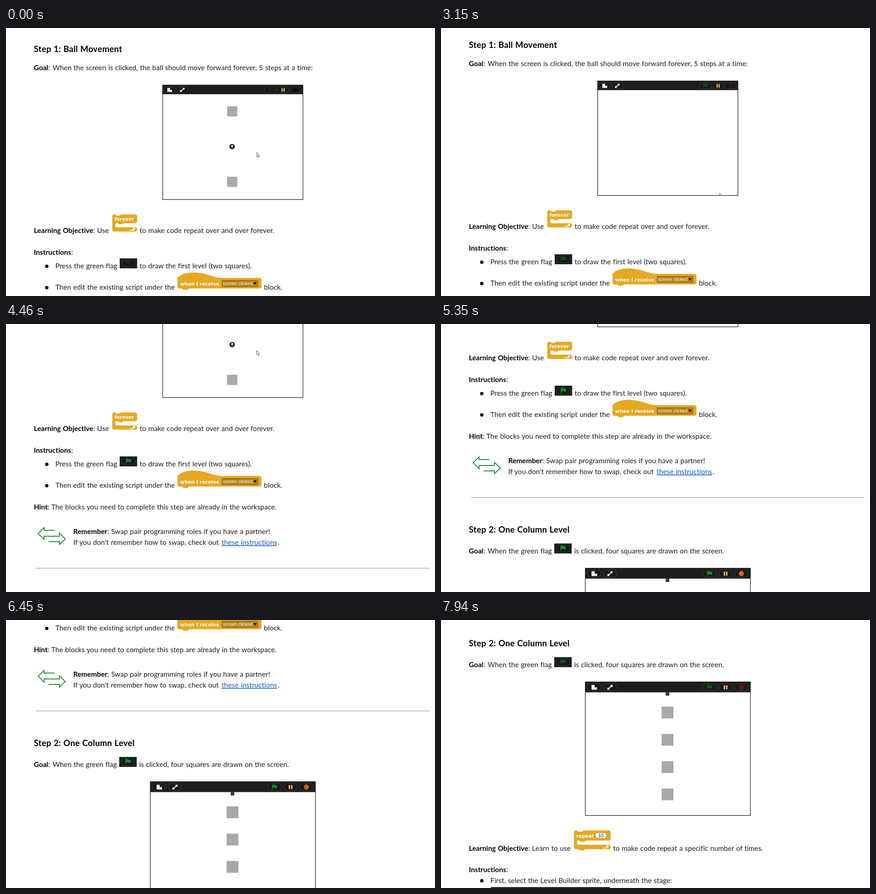
Write an HTML page that moves like this. It is 947 px wide and 591 px high and loops after 8000 ms.

```html
<!DOCTYPE html>
<html lang="en">
<head>
<meta charset="utf-8">
<title>Ball Movement</title>
<style>
html, body { margin: 0; width: 100%; height: 100%; overflow: hidden; background: #fff; }
svg { display: block; width: 100vw; height: 100vh; }
text { font: 15.5px Lato, Carlito, sans-serif; letter-spacing: .04px; word-spacing: .6px; fill: #1a1a1a; white-space: pre; }
.b { font-weight: 700; fill: #000; }
.h { font-size: 18.7px; font-weight: 700; letter-spacing: .25px; fill: #000; }
.link { fill: #15c; }
.code { font: 700 10.5px "DejaVu Sans", sans-serif; letter-spacing: 0; word-spacing: 0; fill: #fff; }
.slot { font: 10.3px "Liberation Sans", sans-serif; letter-spacing: 0; word-spacing: 0; fill: #fff; }
.block { fill: #e6a822; stroke: #d69b20; stroke-width: .6; }
.pill { fill: #191919; stroke: #3b3b3d; }
.frame { fill: #fff; stroke: #222; stroke-width: 1.3; }
.sq { fill: #a9a9a9; }
.flag { fill: var(--flag); }
.stop { fill: var(--stop); }
</style>
</head>
<body>
<svg viewBox="0 0 947 591">
  <defs>
    <clipPath id="view"><rect x="347" y="146" width="308" height="231.500"/></clipPath>
    <rect id="pill" class="pill" x="-13" y="-7" width="26" height="14" rx="7"/>
    <path id="flag" class="flag" d="M-5-4.500C-2-6 0-3 5-3.500L4.500 2C1 3-1 0-3.500 1.500L-4 5H-5Z"/>
    <g id="inlineFlag">
      <rect width="38.500" height="22" fill="#1c1c1f"/>
      <rect class="pill" x="4" y="2" width="30.500" height="17" rx="8.500"/>
      <use href="#flag" transform="translate(19.500 10.500) scale(1.200)"/>
    </g>
    <path id="loop" d="M-7 3H0Q4 3 4 0H7L3-4-1 0H2Q2 1.500 0 1.500H-7Z" fill="#fff"/>
    <path id="size" d="M-5-4.500H1V0H5.500V4.500H-5ZM1-4.500" fill="#fff"/>
    <path id="full" d="M.5-4.500H5V0L3.400-1.500 1.200.7-.7-1.200 2-3ZM-.5 4.500H-5V0L-3.400 1.500-1.400-.5.5 1.400-2 3Z" fill="#fff"/>
    <path id="hold" d="M-3.500-4H-.7V4H-3.500ZM1-4H3.800V4H1Z" fill="#e6b43c"/>
    <path id="halt" class="stop" d="M-2-4.700H2L4.700-2V2L2 4.700H-2L-4.700 2V-2Z"/>
  </defs>

  <g id="page">
    <!-- Step 1 -->
    <text class="h" x="61.500" y="53">Step 1: Ball Movement</text>
    <text x="61.500" y="92.500"><tspan class="b">Goal</tspan>:</text>
    <text x="103" y="92.500">When the screen is clicked, the ball should move forward forever, 5 steps at a time:</text>

    <rect class="frame" x="345.800" y="125.800" width="309.700" height="252.500"/>
    <g id="bar1"></g>
    <g clip-path="url(#view)">
      <rect id="top" class="sq" x="488" y="172.500" width="22.500" height="22.500"/>
      <rect id="bottom" class="sq" x="488" y="328" width="22.500" height="22.500"/>
      <g id="ball">
        <circle r="5.800"/>
        <path d="M0 3.700V-3M-3 0 0-3.200 3 0" fill="none" stroke="#fff" stroke-width="1.500"/>
      </g>
      <path id="cursor" d="M0 0V9.500L2.200 7.600 3.700 11 5 10.400 3.600 7.100H6.600Z" fill="#fff" stroke="#333" stroke-width=".8"/>
    </g>

    <text x="61.500" y="452"><tspan class="b">Learning Objective</tspan>: Use</text>
    <path class="block" d="M237 411.500H241L244 414H251L254 411.500H287L289 413.500V428L287 430H260L257 432.500H250L247 430H243L241 432V438L243 440H287L289 442V447L287 448.500H237L235 446.500V413.500Z"/>
    <text class="code" x="239.500" y="424.500">forever</text>
    <use href="#loop" x="279.500" y="444"/>
    <text x="295" y="452">to make code repeat over and over forever.</text>

    <text x="61.500" y="499.500"><tspan class="b">Instructions</tspan>:</text>
    <circle cx="90" cy="525.500" r="3.700"/>
    <text x="109" y="530">Press the green flag</text>
    <use href="#inlineFlag" x="251" y="508"/>
    <text x="295" y="530">to draw the first level (two squares).</text>
    <circle cx="90" cy="572.500" r="3.700"/>
    <text x="109" y="577">Then edit the existing script under the</text>
    <path class="block" d="M379 551C392 537 422 537 447 545Q464 551.500 478 551.500H561L563.500 554V572L561 574H404L401 577H392L389 574H381L379 572Z"/>
    <text class="code" x="384.500" y="567.500">when I receive</text>
    <rect x="477" y="556.500" width="79.500" height="14" fill="#b08019" stroke="#8a6412"/>
    <text class="slot" x="479" y="567">screen clicked</text>
    <path d="M546 561H553.500L549.800 565.500Z"/>
    <text x="569.500" y="577">block.</text>

    <text x="61.500" y="625"><tspan class="b">Hint</tspan>: The blocks you need to complete this step are already in the workspace.</text>
    <path transform="translate(0 372)" d="M107 299H84V293L71 306 84 319V312H118V305L131 318 118 330V324H94" fill="none" stroke="#2a8a38" stroke-width="1.900"/>
    <text x="148.500" y="679"><tspan class="b">Remember</tspan>: Swap pair programming roles if you have a partner!</text>
    <text x="148.500" y="703">If you don't remember how to swap, check out</text>
    <text class="link" x="476" y="703" text-decoration="underline">these instructions</text>
    <text x="600" y="703">.</text>
    <path d="M66 754.500H935" stroke="#888"/>

    <!-- Step 2 -->
    <text class="h" x="61.500" y="831.500">Step 2: One Column Level</text>
    <text x="61.500" y="878"><tspan class="b">Goal</tspan>:</text>
    <text x="103" y="878">When the green flag</text>
    <use href="#inlineFlag" x="250" y="856"/>
    <text x="294" y="878">is clicked, four squares are drawn on the screen.</text>

    <rect class="frame" x="318.500" y="910.500" width="364.500" height="294.500"/>
    <g id="bar2"></g>
    <rect x="496" y="932" width="8" height="9" rx="1.500" fill="#3a3a3a"/>
    <g id="column"></g>

    <text x="61.500" y="1282.500"><tspan class="b">Learning Objective</tspan>: Learn to use</text>
    <path class="block" d="M296 1238.500H300L303 1241H312L315 1238.500H372L374 1240.500V1258L372 1260H320L317 1262.500H309L306 1260H302L300 1262V1268L302 1270H372L374 1272V1277L372 1279H318L315 1281.500H306L303 1279H296L294 1277V1240.500Z"/>
    <text class="code" x="298.500" y="1254">repeat</text>
    <rect x="340.500" y="1243" width="25.500" height="12.500" rx="6.250" fill="#fff" stroke="#b08019"/>
    <text class="slot" x="347.500" y="1253" style="fill:#111">10</text>
    <use href="#loop" x="364.500" y="1274.500"/>
    <text x="380" y="1282.500">to make code repeat a specific number of times.</text>
    <text x="61.500" y="1329.500"><tspan class="b">Instructions</tspan>:</text>
    <circle cx="90" cy="1349" r="3.700"/>
    <text x="109" y="1353.500">First, select the Level Builder sprite, underneath the stage:</text>
    <rect x="110" y="1363" width="263" height="40" fill="#1e1e1e"/>
  </g>
</svg>
<script>
const LOOP = 8000, RESET = 3700;
const $ = id => document.getElementById(id);

// Toolbar with two buttons on the left and three on the right.
function toolbar(id, x, y, w, h, gap) {
  const button = (icon, bx) =>
    `<g transform="translate(${bx} ${y + h / 2 + .5}) scale(${h / 20})"><use href="#pill"/><use href="#${icon}"/></g>`;
  $(id).innerHTML = `<rect x="${x}" y="${y}" width="${w}" height="${h}" fill="#1d1d1d"/>` +
    ['size', 'full'].map((icon, i) => button(icon, x + gap * (i + .56))).join('') +
    ['halt', 'hold', 'flag'].map((icon, i) => button(icon, x + w - gap * (i + .57))).join('');
}
toolbar('bar1', 345.5, 126, 310, 20, 28);
toolbar('bar2', 318.5, 910.5, 364.5, 23, 35);

$('column').innerHTML = [0, 1, 2, 3].map(i =>
  `<rect class="sq" x="487" y="${965 + i * 60.2}" width="26" height="26"/>`).join('');

const SCROLL = [[2900, 0], [3150, 9], [4460, 216], [5350, 372], [5960, 471], [7000, 647], [7940, 774]];

function scrollAt(t) {
  const i = SCROLL.findIndex(([time]) => time > t);
  if (i < 1) return i ? SCROLL.at(-1)[1] : 0;
  const [[t0, y0], [t1, y1]] = SCROLL.slice(i - 1, i + 1);
  return Math.round(y0 + (y1 - y0) * (t - t0) / (t1 - t0));
}

const show = (id, on) => $(id).setAttribute('visibility', on ? 'visible' : 'hidden');
const place = (id, x, y, turn = 0) => $(id).setAttribute('transform', `translate(${x} ${y}) rotate(${turn})`);

function draw(now) {
  const t = now % LOOP, game = t < RESET ? t : 0;
  place('page', 0, -scrollAt(t));

  // The ball rises, turns at the top square, turns at the bottom one and leaves upwards.
  const path = Math.max(0, game - 630) * .19, hitTop = path > 61.5, hitBottom = path > 184.5;
  place('ball', 499.2, hitBottom ? 507.5 - path : 200 + Math.abs(path - 61.5), hitTop && !hitBottom ? 180 : 0);
  show('top', !hitTop);
  show('bottom', !hitBottom);

  const away = Math.max(0, game - 2930) / 220;
  place('cursor', 553.5 + 61.5 * away, 274.5 + 98.5 * away);

  // The buttons light up and fade again.
  const lit = Math.max(0, Math.sin(Math.PI * (t - 2600) / 6200)) * (t > 2600);
  document.body.style.setProperty('--flag', `rgb(12, ${50 + 100 * lit}, ${14 + 16 * lit})`);
  document.body.style.setProperty('--stop', `rgb(${15 + 200 * lit}, ${8 + 95 * lit ** 2}, 15)`);
  requestAnimationFrame(draw);
}
draw(performance.now());
</script>
</body>
</html>
```
